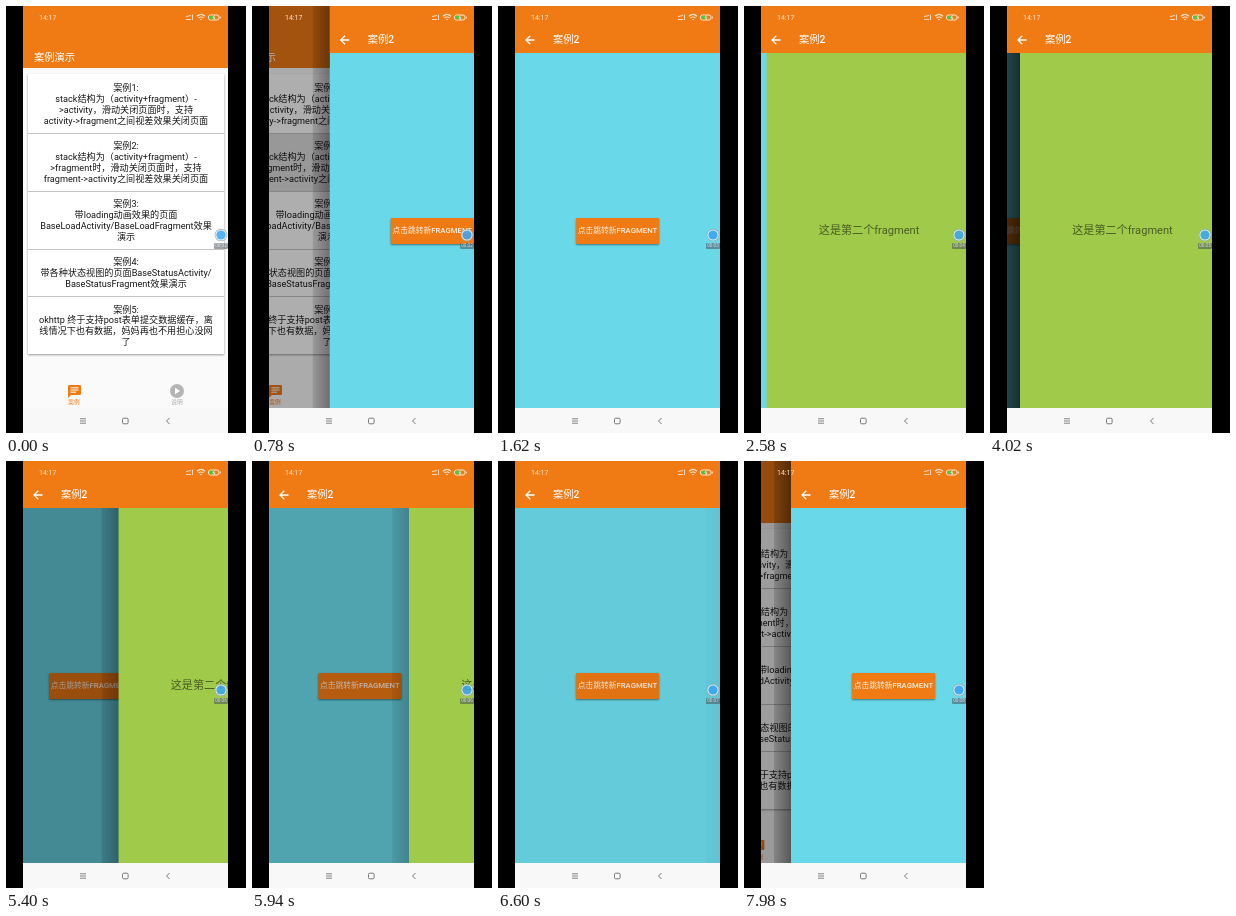
Recreate the animation shown at these times as an HTML page. Size 240 by 427 pixels, loop 8000 ms.

```html
<!DOCTYPE html>
<html lang="zh-CN">
<head>
<meta charset="utf-8">
<style>
html, body { margin: 0; width: 100%; height: 100%; overflow: hidden; background: #000; }
body { font-family: Roboto, "Noto Sans CJK SC", "Noto Sans CJK", sans-serif; }
div, svg { position: absolute; box-sizing: border-box; white-space: nowrap; }
#screen { left: 17px; top: 0; width: 205px; height: 427px; overflow: hidden; background: #fafafa; }
.page { left: 0; top: 0; width: 205px; height: 402px; }
.bar { left: 0; top: 0; width: 205px; background: #f07a14; color: #fff; font-size: 10.25px; line-height: 14px; }
.body { left: 0; top: 47px; width: 205px; height: 355px; overflow: hidden; }
.scrim { inset: 0; background: #000; opacity: 0; }
.shadow { left: -17px; top: 0; width: 17px; height: 100%; background: linear-gradient(90deg, rgba(0,0,0,.16), rgba(0,0,0,.5)); }
#home { background: #fafafa; }
#list { left: 5px; top: 68px; width: 196px; padding-top: 2.4px; background: #fff; box-shadow: 0 1px 2px rgba(0,0,0,.4); }
.row { position: relative; padding: 7.1px 0 6.5px; border-bottom: 1px solid #c4c4c4; white-space: pre; text-align: center; font-size: 9.15px; line-height: 10.85px; color: #161616; }
.row:last-child { border: 0; }
.tab { top: 392px; width: 40px; text-align: center; font-size: 5.7px; line-height: 9px; }
#first { background: #69d8e8; }
#second { background: #a0ca4a; overflow: visible; }
#button { left: 61px; top: 164.5px; width: 83px; height: 26.5px; border-radius: 1px; background: #f07a14; color: #fff0e2; font-size: 7.75px; line-height: 26.5px; text-align: center; box-shadow: 0 1px 2px rgba(0,0,0,.45); }
#button b { font-weight: 500; }
#message { left: 0; top: 170px; width: 205px; text-align: center; font-size: 11.1px; line-height: 16px; color: rgba(0,0,0,.54); }
#nav { left: 0; top: 402px; width: 205px; height: 25px; background: #f8f8f8; }
#clock { left: 16px; top: 7px; font-size: 7px; line-height: 10px; color: #ffe6d0; }
#timer { left: 191px; top: 236.5px; width: 14px; height: 6.5px; border-radius: 1px; background: rgba(70,80,85,.55); color: #dde; font-size: 4.7px; line-height: 6.5px; text-align: center; }
</style>
</head>
<body>
<div id="screen">
  <div id="home" class="page">
    <div class="bar" style="height:62px"><div style="left:11px;top:45px">案例演示</div></div>
    <div id="list"></div>
    <div class="tab" style="left:31px;color:#f07a14">案例</div>
    <div class="tab" style="left:134px;color:#aaa">说明</div>
    <svg width="205" height="402" style="left:0;top:0">
      <path d="M46 379h11q1 0 1 1v8q0 1-1 1h-9l-3 3v-12q0-1 1-1z" fill="#f07a14"/>
      <path d="M47.5 381.8h8m-8 2.2h8m-8 2.2h5.5" stroke="#fff"/>
      <circle cx="154" cy="385" r="7" fill="#b5b5b5"/>
      <path d="M152 381.8l5 3.2-5 3.2z" fill="#fff"/>
    </svg>
    <div id="homeScrim" class="scrim"></div>
  </div>
  <div id="detail" class="page">
    <div id="detailShadow" class="shadow"></div>
    <div class="body">
      <div id="first" class="page">
        <div id="button">点击跳转新<b>FRAGMENT</b></div>
        <div id="firstScrim" class="scrim"></div>
      </div>
      <div id="second" class="page">
        <div id="secondShadow" class="shadow"></div>
        <div id="message">这是第二个fragment</div>
      </div>
    </div>
    <div class="bar" style="height:47px">
      <svg width="30" height="47" style="left:0;top:0" fill="none" stroke="#fff" stroke-width="1.3"><path d="M19.5 34h-8.5m4.3-4.3L11 34l4.3 4.3"/></svg>
      <div style="left:38px;top:27px">案例<span style="font-weight:500">2</span></div>
    </div>
  </div>
  <div id="nav"></div>
  <div id="clock">14:17</div>
  <svg width="205" height="427" style="left:0;top:0" fill="none">
    <g stroke="#777"><path d="M57 412.8h6m-6 2.2h6m-6 2.2h6" stroke-width=".9"/><rect x="99.5" y="412.2" width="5.6" height="5.6" rx="1.2"/><path d="M146.5 412l-3 3 3 3"/></g>
    <g stroke="#ffe6d0">
      <path d="M163 10.5l5-1m-5 4h5M169.5 14V8.500" stroke-width=".9"/>
      <path d="M174 10.200q4-3.500 8 0m-6.500 1.800q2.500-2 5 0" stroke-width="1.200"/>
      <path d="M176.800 13h2.400l-1.200 1.500z" fill="#ffe6d0" stroke="none"/>
      <rect x="185.500" y="9" width="10.500" height="5" rx="2"/>
    </g>
    <rect x="186.500" y="9.800" width="5" height="3.400" rx="1" fill="#58c040"/>
    <path d="M191.500 9.500l-1.500 2.300h1.800l-1 2" stroke="#fff" stroke-width=".7"/>
    <path d="M197.300 10.500v2" stroke="#ffe6d0"/>
    <g opacity=".85"><circle cx="198" cy="229" r="6.300" fill="#8fa3ad"/><circle cx="198" cy="229" r="5.600" fill="#eef6fa"/><circle cx="198" cy="229" r="4.600" fill="#3aa4f4"/></g>
  </svg>
  <div id="timer"></div>
</div>
<script>
const LOOP = 8000, STEP = 60, WIDTH = 205;
const el = id => document.getElementById(id);
const rows = [
  "stack结构为（activity+fragment）-\n>activity，滑动关闭页面时，支持\nactivity->fragment之间视差效果关闭页面",
  "stack结构为（activity+fragment）-\n>fragment时，滑动关闭页面时，支持\nfragment->activity之间视差效果关闭页面",
  "带loading动画效果的页面\nBaseLoadActivity/BaseLoadFragment效果\n演示",
  "带各种状态视图的页面BaseStatusActivity/\nBaseStatusFragment效果演示",
  "okhttp 终于支持post表单提交数据缓存，离\n线情况下也有数据，妈妈再也不用担心没网\n了"
].map((text, i) => {
  const row = document.createElement("div");
  row.className = "row";
  row.textContent = `案例${i + 1}:\n${text}`;
  el("list").append(row);
  return row;
});

const between = (t, a, b) => t >= a && t < b;
const moveX = (id, x) => { el(id).style.transform = `translateX(${x}px)`; };
const fade = (id, opacity) => { el(id).style.opacity = Math.max(0, opacity); };
const slideIn = (t, start, end) => {
  const p = Math.min(1, Math.max(0, (t - start) / (end - start)));
  return WIDTH * (1 - p) ** 3;
};
// Linear interpolation through [time, value] pairs
function follow(t, keys) {
  const i = keys.findIndex(key => key[0] > t);
  if (i < 0) return keys[keys.length - 1][1];
  if (i === 0) return keys[0][1];
  const [t0, v0] = keys[i - 1], [t1, v1] = keys[i];
  return v0 + (v1 - v0) * (t - t0) / (t1 - t0);
}
const closeSecond = [[3660, 0], [4020, 13], [4920, 56], [5940, 140], [6300, 168], [6540, 205], [6600, 208], [6840, 230]];
const closeDetail = [[6960, 0], [7320, 8], [7980, 30]];

function draw(now) {
  let t = now % LOOP;
  t -= t % STEP;

  const detailX = t < 6960 ? slideIn(t, 600, 1140) : follow(t, closeDetail);
  const covered = 1 - detailX / WIDTH;
  moveX("detail", detailX);
  moveX("home", -64 * covered);
  fade("homeScrim", .45 * covered);
  fade("detailShadow", covered);

  const dragging = t >= 3660;
  const secondX = dragging ? follow(t, closeSecond) : slideIn(t, 2160, 2760);
  const remaining = dragging ? 1 - secondX / 230 : 0;
  moveX("second", secondX);
  moveX("first", dragging ? Math.min(0, .524 * secondX - 85) : 0);
  fade("firstScrim", .62 * remaining);
  fade("secondShadow", remaining);

  rows[1].style.background = between(t, 480, 900) ? "#dedede" : "";
  el("button").style.background = between(t, 1980, 2400) ? "#f49a4c" : "";
  el("timer").textContent = "00:0" + Math.floor(2 + t / 1000 * .8);
  requestAnimationFrame(() => draw(performance.now()));
}
draw(performance.now());
</script>
</body>
</html>
```
